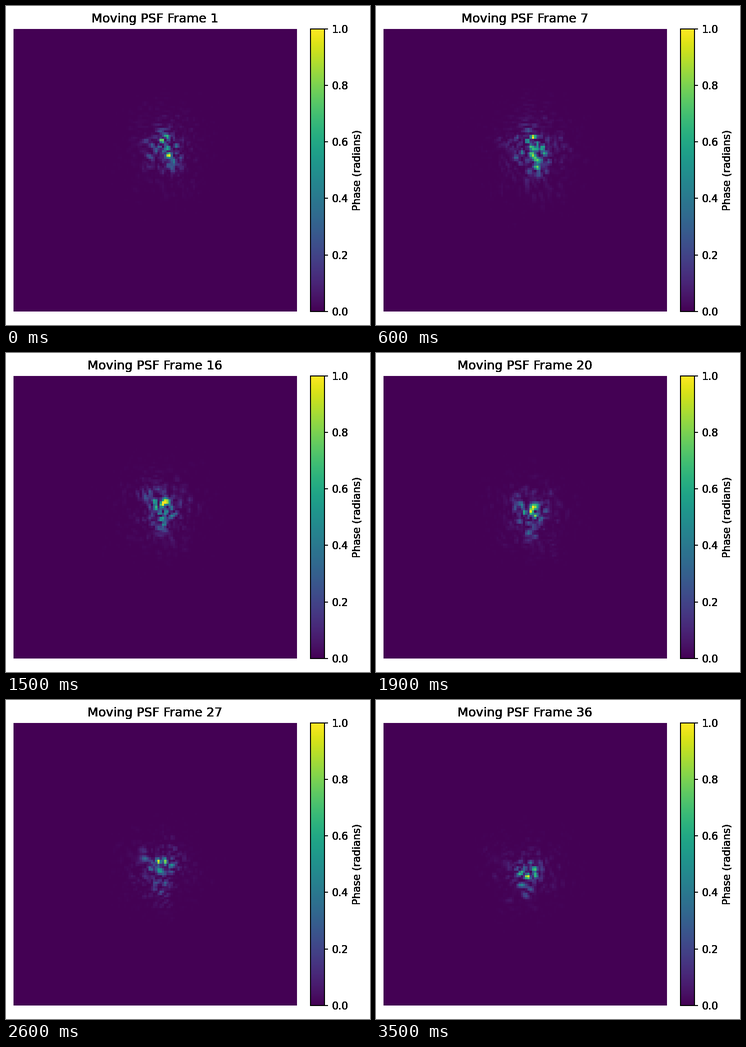
A matplotlib script for the animation above (3.6 s loop, 728 by 639 pixels).

```python
import numpy as np
import matplotlib.pyplot as plt
from matplotlib.animation import FuncAnimation

W, H, DPI = 728, 639, 150
N, STEPS, STEP_MS = 128, 36, 100
LEFT, TOP, SIDE = 15, 45.5, 566.6
CELL = SIDE / N
PUPIL_RADIUS, COHERENCE = 33, 7.2
START, END = np.array([319, 289]), np.array([303, 349])  # stage pixels

plt.rcParams["font.family"] = "DejaVu Sans"

axis = np.arange(N) - N // 2
X, Y = np.meshgrid(axis, axis)
PUPIL = np.hypot(X, Y) <= PUPIL_RADIUS


def phase_screen(size, r0, seed):
    """Random Kolmogorov phase on a periodic grid."""
    rng = np.random.default_rng(seed)
    f = np.hypot(*np.meshgrid(np.fft.fftfreq(size), np.fft.fftfreq(size)))
    f[0, 0] = np.inf
    amp = np.sqrt(0.023) * r0 ** (-5 / 6) * f ** (-11 / 6) / size
    noise = rng.normal(size=f.shape) + 1j * rng.normal(size=f.shape)
    return np.real(np.fft.ifft2(noise * amp)) * size ** 2


SCREEN = phase_screen(256, COHERENCE, 12)


def drift(i):
    """Centre of the spot in cells from the middle of the grid."""
    t = i / (STEPS - 1)
    ease = np.array([t, t * t * (3 - 2 * t)])
    spot = START + (END - START) * ease
    return (spot - (LEFT, TOP)) / CELL - N / 2 - 0.5


def psf(i):
    """Speckle image of a phase screen blowing across the pupil."""
    phase = np.roll(SCREEN, (-i, -2 * i), axis=(0, 1))[:N, :N]
    slope_y, slope_x = (g[PUPIL].mean() for g in np.gradient(phase))
    dx, dy = drift(i) * 2 * np.pi / N
    phase = phase + (dx - slope_x) * X + (dy - slope_y) * Y
    field = np.fft.fftshift(np.fft.fft2(PUPIL * np.exp(1j * phase)))
    image = np.abs(field) ** 2
    return image / image.max()


def panel(fig, x, y, w, h):
    return fig.add_axes([x / W, 1 - (y + h) / H, w / W, h / H])


def harden(artist, times=8):
    """Draw an artist repeatedly so its soft edges turn solid."""
    draw = artist.draw

    def repeat(renderer):
        for _ in range(times):
            draw(renderer)

    artist.draw = repeat


fig = plt.figure(figsize=(W / DPI, H / DPI), dpi=DPI, facecolor="white")
ax = panel(fig, LEFT, TOP, SIDE, SIDE)
im = ax.imshow(psf(0), cmap="viridis", vmin=0, vmax=1,
               interpolation="nearest", aspect="auto")
ax.axis("off")
title = ax.set_title("Moving PSF Frame 1", fontsize=12)
bar = fig.colorbar(im, cax=panel(fig, 609, TOP, 28.3, SIDE))
bar.set_label("Phase (radians)")

for artist in [title, bar.outline, bar.ax.yaxis.label]:
    harden(artist)
for tick in bar.ax.yaxis.get_major_ticks():
    harden(tick.label2)
    harden(tick.tick2line)


def update(i):
    im.set_data(psf(i))
    title.set_text(f"Moving PSF Frame {i + 1}")
    return im, title


anim = FuncAnimation(fig, update, frames=STEPS, interval=STEP_MS,
                     repeat=True, repeat_delay=0)
plt.show()
```
